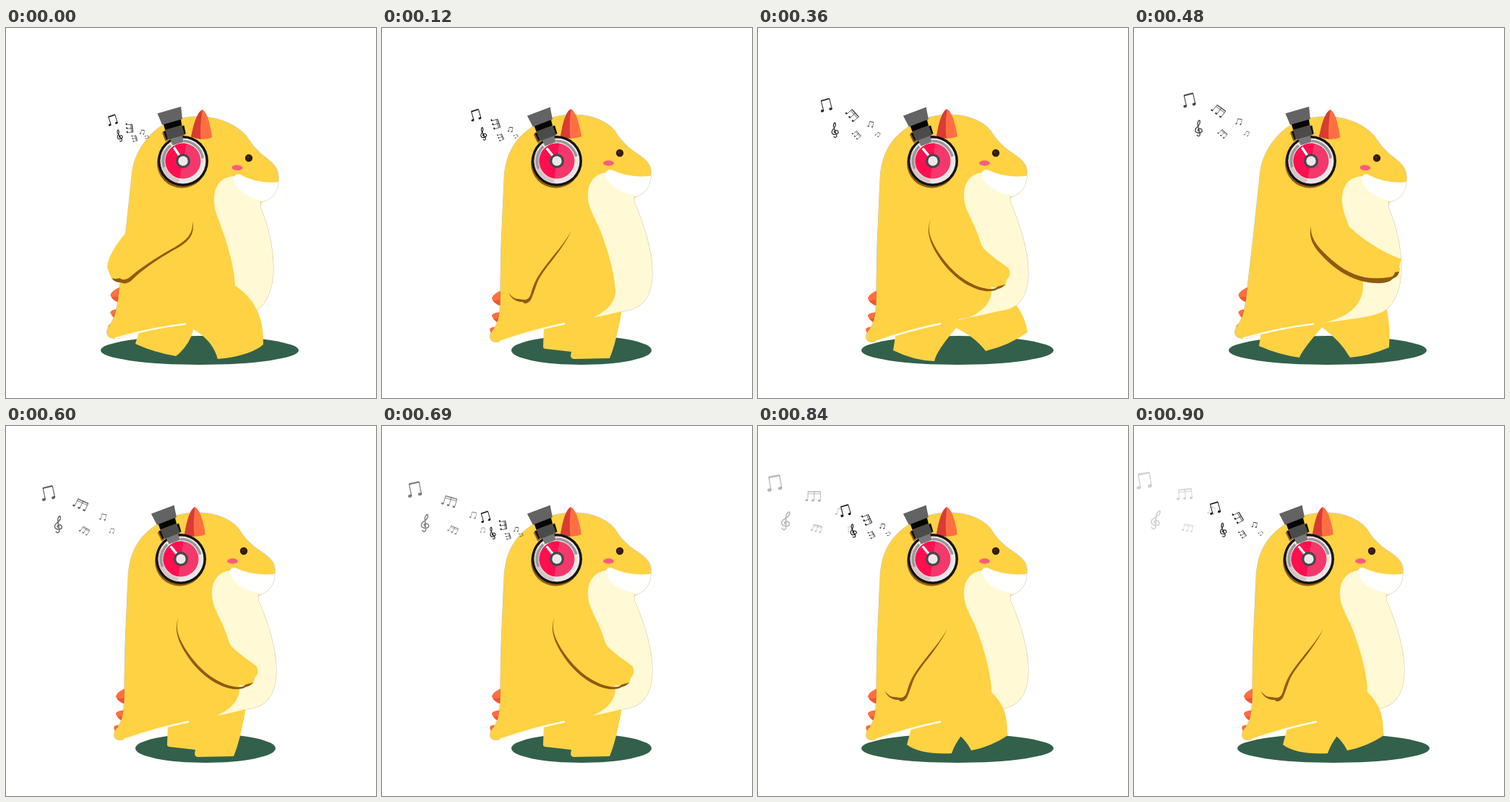
An HTML page with a canvas that plays this animation: 512 px wide and 512 px high, repeating every 930 ms.

```html
<!DOCTYPE html>
<html lang="en">
<head>
<meta charset="utf-8">
<title>Walking dino with headphones</title>
<style>
html, body { margin: 0; width: 100%; height: 100%; overflow: hidden; background: #fff; }
canvas { display: block; width: 512px; height: 512px; }
</style>
</head>
<body>
<canvas id="stage" width="512" height="512"></canvas>
<script>
const ctx = document.getElementById('stage').getContext('2d');
const LOOP = 930, HOLD = 120, SECOND_NOTES = 660, DRIFT = 900;
const YELLOW = '#ffd243', CREAM = '#fffad5', BROWN = '#8f5a12';
const ORANGE = '#ff6f42', RED = '#d83c33';
const rad = deg => deg * Math.PI / 180;
const path = d => new Path2D(d);

// Body leaning forward, upright and back
const bodies = {
  forward: {
    skin: path('M140 424Q138 418 145 409C154 395 155 375 158 350L165 290L174 205C176 178 190 155 210 139C230 125 252 122 272 123C300 124 322 137 333 150C341 163 350 172 358 178C372 189 378 195 377 211C376 226 370 237 355 240Q350 243 353 250C364 278 370 305 370 335C369 365 358 385 345 392L262 408Q203 414 157 429Q142 431 140 424Z'),
    belly: path('M288 238C288 215 300 206 316 205L354 238Q350 243 353 250C364 278 370 305 370 335C369 365 358 385 345 392C330 400 300 403 262 408C300 400 318 380 317 355C315 325 305 295 296 270C290 255 288 248 288 238Z'),
    tail: path('M151 429.5Q203 414.5 249 409.5'), eye: [336, 180, 2.5], horn: [270.5, 153, 2], cup: [245, -16], spikes: [-7.5, -4.5]
  },
  upright: {
    skin: path('M150 430Q148 424 155 416C163 404 164 390 164 350L165 300L169 210C170 178 182 155 205 139C225 124 248 120 265 120C292 120 312 130 322 142C330 156 342 167 352 173C368 184 373 190 372 203C372 217 366 229 350 234Q347 238 351 245C364 277 374 310 374 338C374 370 362 385 343 390L290 400L250 408Q207 418 166 433Q152 437 150 430Z'),
    belly: path('M285 232C285 210 298 200 313 200L350 232Q347 238 351 245C364 277 374 310 374 338C374 370 362 385 343 390C325 393 308 398 291 401C312 392 324 378 323 362C320 330 310 300 300 275C290 255 285 245 285 232Z'),
    tail: path('M163 434Q207 418.5 253 409'), eye: [329, 173, 0], horn: [261.5, 152, 0], cup: [242, -21], spikes: [0, 0]
  },
  back: {
    skin: path('M152 433Q150 427 156 418C163 400 163 385 163 350L164 205C165 177 179 154 202 138C222 123 245 119 262 120C288 121 308 132 320 146C330 160 345 167 353 174C363 183 366 188 365 199C364 214 358 224 346 229Q341 233 346 240C362 270 372 300 372 333C372 362 362 382 338 389L296 398L243 411Q205 416 166 435Q154 440 152 433Z'),
    belly: path('M279 224C279 204 290 196 304 196L346 228Q341 233 346 240C362 270 372 300 372 333C372 362 362 382 338 389L296 398C315 390 323 378 322 357C320 325 308 295 297 270C286 250 279 240 279 224Z'),
    tail: path('M168 435.5Q205 417 243 412'), eye: [321.5, 169, -3], horn: [253.5, 151, -2], cup: [239, -32], spikes: [-.5, 3]
  }
};

const arms = {
  farBack: {
    skin: path('M175 272L166 283C150 302 141 318 140 331L145 345Q155 352 165 350C182 338 215 318 240 302C256 292 260 280 258 267L200 250Z'),
    shade: path('M258 267C261 282 257 293 238 304C205 322 185 338 174 349Q166 356 158 352Q150 352 146 346Q152 348 157 346Q164 351 171 345C185 333 205 319 235 302.5C254 291 259 282 258 267Z')
  },
  behind: {
    shade: path('M262 281C245 315 225 330 215 352Q208 372 206 376Q202 382 197 381Q194 378 192 379Q180 378 175 366Q182 376 190 375Q194 376 198 376Q203 376 206 368C212 345 222 335 238 314Q252 298 262 281Z')
  },
  down: {
    shade: path('M220 278C217 325 222 365 262 386Q267 390.5 272 387Q277 391.5 280 386Q289 382 287 373Q286 365 281 358Q285 367 286 374Q286 381 279 382Q277 389.5 272 386Q267 389 262 385.2C223.2 364.5 218 325 220 278Z')
  },
  ahead: {
    skin: path('M262 270L300 285L312 305C325 318 338 325 347 333Q351 342 344 349L342 357Q335 356 330 359C300 358 270 340 240 285Z'),
    shade: path('M239 265C234 278 237 290 248 308C265 335 290 357 318 361Q328 362 331 358L342 355Q338 360 332 361Q326 365 314 364C288 360 262 338 247 312C234 290 234 276 239 265Z')
  },
  farAhead: {
    skin: path('M265 260L299 276C325 300 350 312 370 320L367 330Q370 336 365 339Q362 347 355 346C330 350 290 345 246 295Z'),
    shade: path('M245 274C244 290 252 302 275 322C300 344 325 349 352 345Q360 345 361 338L367 337Q366 344 358 347Q352 354 335 353C305 352 280 336 262 317C245 300 242 288 245 274Z')
  }
};

const passing = 'M224 412L223 441Q223 444 227 444L262 448L261 454Q262 458 266 458L315 457Q324 436 332 390L270 380Z';
const pose = (lean, arm, shadow, rear, near) =>
  ({ ...bodies[lean], arm: arms[arm], shadow, rear: path(rear), near: path(near) });
const poses = [
  pose('forward', 'farBack', [268, 137], 'M186 415L179 437Q205 449 235 454L239 451Q255 436 259 418L255 400Z',
    'M318 357C342 374 357 397 356 438C345 448 320 456 293 458Q286 432 258 416L256 404L300 375Z'),
  pose('upright', 'behind', [276, 97], passing, ''),
  pose('back', 'down', [276, 118], 'M369 358Q382 372 384 390L389 393Q370 416 343 430L338 429Q328 408 294 402L300 380Z',
    'M212 405L214 430L218 460H281L280 455Q290 430 296 398L270 380Z'),
  pose('upright', 'ahead', [276, 133], 'M357 383Q370 400 373 421Q348 439 315 447Q300 427 272 414L278 404Z',
    'M193 408L187 446Q215 460 244 461Q247 446 277 412L278 403L240 380Z'),
  pose('forward', 'farAhead', [268, 137], 'M350 390Q355 415 353 442Q325 454 299 456Q285 432 260 414L262 407Z',
    'M178 408L173 440Q200 452 229 456Q232 446 262 412L261 408L230 380Z'),
  pose('upright', 'ahead', [276, 97], passing, ''),
  pose('back', 'down', [276, 118], 'M237 405L244 459.5H306L305 455Q309 445 311 430L320 390Z',
    'M322 367Q336 378 346 406L351 408Q337 422 311 433L285 420L284 390Z'),
  pose('upright', 'behind', [276, 133], 'M213 415L206 441Q225 455 268 453Q272 441 281 429L290 395Z',
    'M323 368C340 385 345 400 345 424L346 428Q322 444 295 449Q290 438 279 428L276 397L300 380Z')
];

const spikes = path('M168 362Q152 368 152 375Q156 381 168 385ZM166 393Q151 394 152 399Q156 407 164 409ZM160 414Q149 413 149 418Q151 424 156 425Z');
const spikeShade = path('M168 376L153 377Q158 384 168 385ZM166 402L154 402Q159 408 164 409Z');
// Reaches past the chin, where the body clips it
const mouth = path('M-20 29Q-18 22 -12 23Q15 36 46 31L48 50L30 66L19 58Q-14 51 -20 29Z');
const horn = path('M-14.5 -2Q-9 -36 0 -40Q9 -35 14.5 -2Q0 4 -14.5 -2Z');
const hornSide = path('M0 -40Q-9 -36 -14.5 -2L-1 1Q-3 -18 0 -40Z');
const clef = path('M-.14 .4Q0 .56 .07 .38L-.06 -.28Q-.02 -.5 .08 -.48Q.15 -.3 -.08 -.1Q-.3 .08 -.16 .24Q.05 .34 .2 .2Q.22 0 .02 .02Q-.12 .08 -.02 .18');

function fill(shape, color) {
  ctx.fillStyle = color;
  ctx.fill(shape);
}

function ellipse(x, y, rx, ry, color) {
  ctx.fillStyle = color;
  ctx.beginPath();
  ctx.ellipse(x, y, rx, ry, 0, 0, 7);
  ctx.fill();
}

function poly(color, ...pts) {
  ctx.fillStyle = color;
  ctx.beginPath();
  for (const [x, y] of pts) ctx.lineTo(x, y);
  ctx.fill();
}

function line(shape, color, width) {
  ctx.strokeStyle = color;
  ctx.lineWidth = width;
  ctx.stroke(shape);
}

function arc(r, from, to, color, width) {
  const p = new Path2D();
  p.arc(0, 0, r, rad(from), rad(to));
  line(p, color, width);
}

function at(x, y, deg, draw) {
  ctx.save();
  ctx.translate(x, y);
  ctx.rotate(rad(deg));
  draw();
  ctx.restore();
}

function drawHeadphones([x, tilt]) {
  ellipse(x - 1.5, 187, 34.5, 34.5, '#8f5d12');
  ellipse(x, 184, 35, 35, '#171314');
  ellipse(x, 184, 31.5, 31.5, '#ece6e6');
  at(x, 184, (tilt + 32) * .7, () => {
    arc(28.5, 90, 200, '#d2c7c7', 6);
    ellipse(0, 0, 24.5, 24.5, '#f5386c');
    fill(path('M0 -24.5A24.5 24.5 0 0 0 0 24.5Z'), '#ff0f50');
  });
  at(x, 184, tilt, () => {
    arc(27.5, -182, -112, '#9b9696', 3.5);
    arc(27.5, -72, 8, '#9b9696', 3.5);
    poly('#8f5d12', [-17, -46], [-12, -46], [-12, -33], [-16, -33]);
    poly('#777', [-9, -35], [9, -35], [8, -25], [-8, -25]);
    poly('#111', [-15, -47], [15, -47], [14, -35], [-14, -35]);
    poly('#4b4b4b', [-12, -48], [12, -48], [12, -34], [-12, -34]);
    poly('#050505', [-12, -57], [13, -57], [12, -48], [-12, -48]);
    poly('#636363', [-16, -73], [18, -73], [15, -56], [-14, -56]);
    line(path('M0 0L-7 -21.5'), '#fff', 3.4);
  });
  ellipse(x, 184, 10, 10, '#46474b');
  ellipse(x, 184, 6.7, 6.7, '#eee9e9');
}

function drawDino(p) {
  ellipse(p.shadow[0], 446, p.shadow[1], 20, '#33604b');
  at(...p.spikes, 0, () => {
    fill(spikes, ORANGE);
    fill(spikeShade, '#ed5737');
  });
  line(p.skin, 'rgba(70,70,80,.45)', .8);
  fill(p.rear, YELLOW);
  fill(p.skin, YELLOW);
  fill(p.belly, CREAM);
  fill(p.near, YELLOW);
  line(p.tail, '#fffbe6', 2.4);
  if (p.arm.skin) fill(p.arm.skin, YELLOW);
  fill(p.arm.shade, BROWN);
  ctx.save();
  ctx.clip(p.skin);
  at(...p.eye, () => fill(mouth, '#fff'));
  ctx.restore();
  at(...p.eye, () => {
    ellipse(-15.5, 14, 7.5, 3.7, '#fb5d80');
    ellipse(0, 0, 5.2, 5.2, '#341c12');
    ellipse(-1, -1, 1.2, 1.2, '#5a3420');
  });
  at(...p.horn, () => {
    fill(horn, ORANGE);
    fill(hornSide, RED);
  });
  drawHeadphones(p.cup);
}

// Two notes under one beam, or three under a double beam
function beamed(count) {
  const w = count > 2 ? .58 : .34;
  for (let i = 0; i < count; i++) {
    const x = -w + 2 * w * i / (count - 1);
    ellipse(x - .1, .4, .13, .1, '#000');
    line(path(`M${x} .4V-.42`), '#000', .06);
  }
  line(path(`M${-w} -.4L${w} -.42`), '#000', .11);
  if (count > 2) line(path(`M${-w} -.2L${w} -.22`), '#000', .06);
}

// note count (0 is the clef), start, end, size, start and end angle
const notes = [
  [2, [148, 127], [15, 75], 14, -17, -9],
  [0, [157, 149], [30.5, 130], 17, -22, 15],
  [3, [171, 139], [71, 94], 9.5, 84, -4],
  [3, [178, 153], [75, 141], 6.5, 75, 10],
  [2, [189, 144], [108, 117], 6.5, 8, 12],
  [2, [195, 151], [123, 142], 5, 70, -20]
];

function drawNotes(ms) {
  const k = ms / DRIFT;
  const mix = (a, b) => a + (b - a) * k;
  ctx.globalAlpha = .94 - .76 * k * k;
  for (const [count, from, to, size, a, b] of notes) {
    at(mix(from[0], to[0]), mix(from[1], to[1]), mix(a, b), () => {
      const s = size * mix(1, 1.62);
      ctx.scale(s, s);
      if (count) beamed(count);
      else line(clef, '#000', .06);
    });
  }
  ctx.globalAlpha = 1;
}

function frame() {
  const t = Math.floor(performance.now() % LOOP / 30) * 30;
  ctx.fillStyle = '#fff';
  ctx.fillRect(0, 0, 512, 512);
  drawDino(poses[Math.floor(t / HOLD)]);
  drawNotes(t);
  if (t >= SECOND_NOTES) drawNotes(t - SECOND_NOTES);
  requestAnimationFrame(frame);
}
frame();
</script>
</body>
</html>
```
